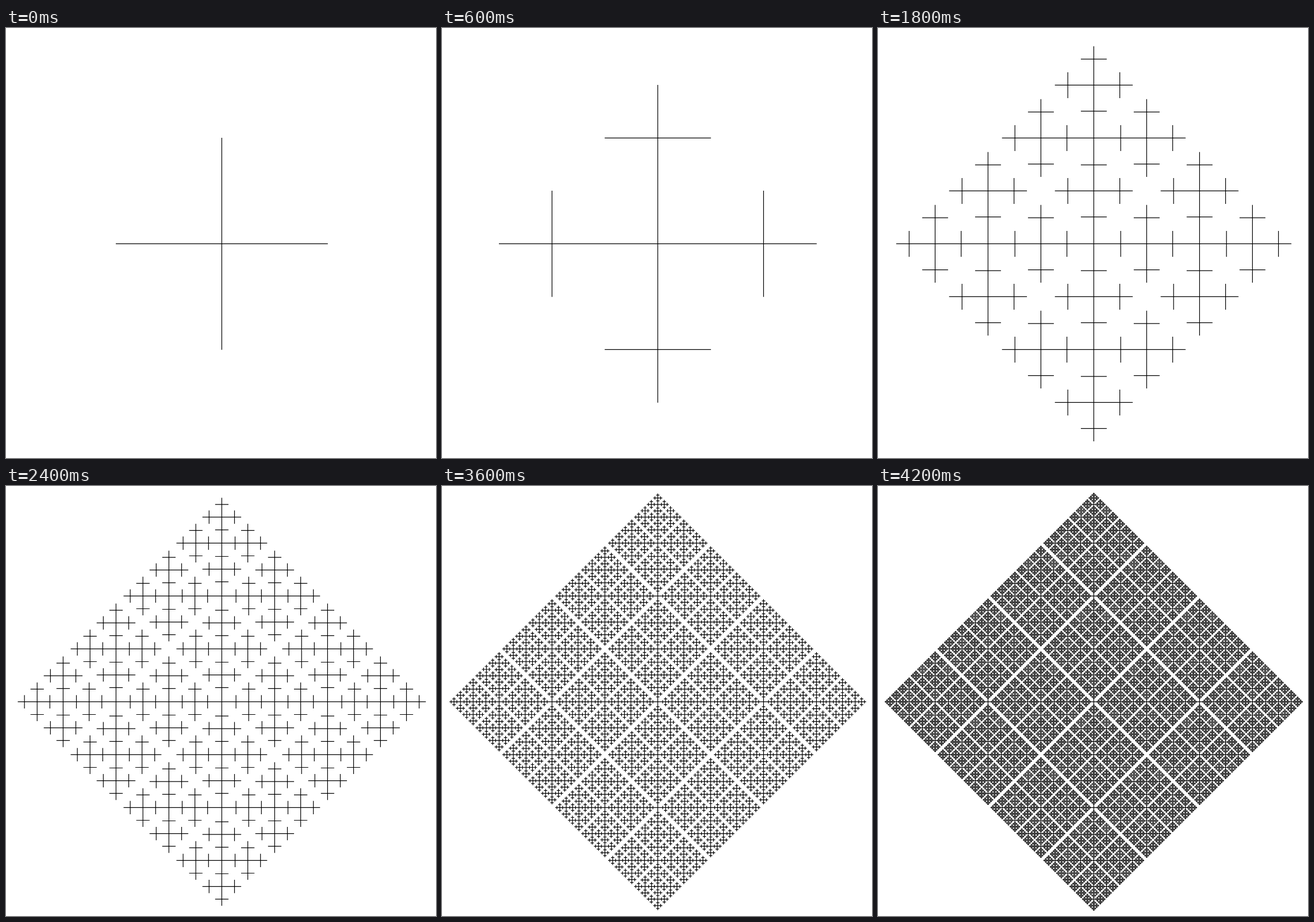
Animation, 748 px wide and 748 px high, one loop 4800 ms. Source, as an HTML page with a canvas:

```html
<!DOCTYPE html>
<html lang="en">
<head>
<meta charset="utf-8">
<title>Branching crosses</title>
<style>
  html, body { margin: 0; width: 100%; height: 100%; overflow: hidden; background: #fff; }
  canvas { display: block; width: 748px; height: 748px; }
</style>
</head>
<body>
<canvas id="stage" width="748" height="748"></canvas>
<script>
const SIZE = 748, CENTER = 375.4, WIDTH = 1.2, STEP = 600;
const ARMS = [184, 92, 45.2, 22.1, 11.2, 5, 2.5, 1.3];
const CAP = 0.4;
const GREY_STEP = 2;

const ctx = document.getElementById("stage").getContext("2d");
const paths = [];
let shown = -1;

// Each cross grows a smaller cross on all four tips.
function addCross(path, x, y, depth, last) {
  const arm = ARMS[depth], reach = arm + CAP, half = WIDTH / 2;
  path.rect(x - reach, y - half, reach * 2, WIDTH);
  path.rect(x - half, y - reach, WIDTH, reach * 2);
  if (depth === last) return;
  addCross(path, x - arm, y, depth + 1, last);
  addCross(path, x + arm, y, depth + 1, last);
  addCross(path, x, y - arm, depth + 1, last);
  addCross(path, x, y + arm, depth + 1, last);
}

function getPath(step) {
  if (!paths[step]) {
    paths[step] = new Path2D();
    addCross(paths[step], CENTER, CENTER, 0, step);
  }
  return paths[step];
}

function draw(step) {
  ctx.fillStyle = step === GREY_STEP ? "#cecece" : "#fff";
  ctx.fillRect(0, 0, SIZE, SIZE);
  ctx.fillStyle = "#000";
  ctx.fill(getPath(step));
}

function tick() {
  const step = Math.floor(performance.now() / STEP) % ARMS.length;
  if (step !== shown) {
    draw(step);
    shown = step;
  }
  requestAnimationFrame(tick);
}

ARMS.forEach((_, step) => getPath(step));
tick();
</script>
</body>
</html>
```
